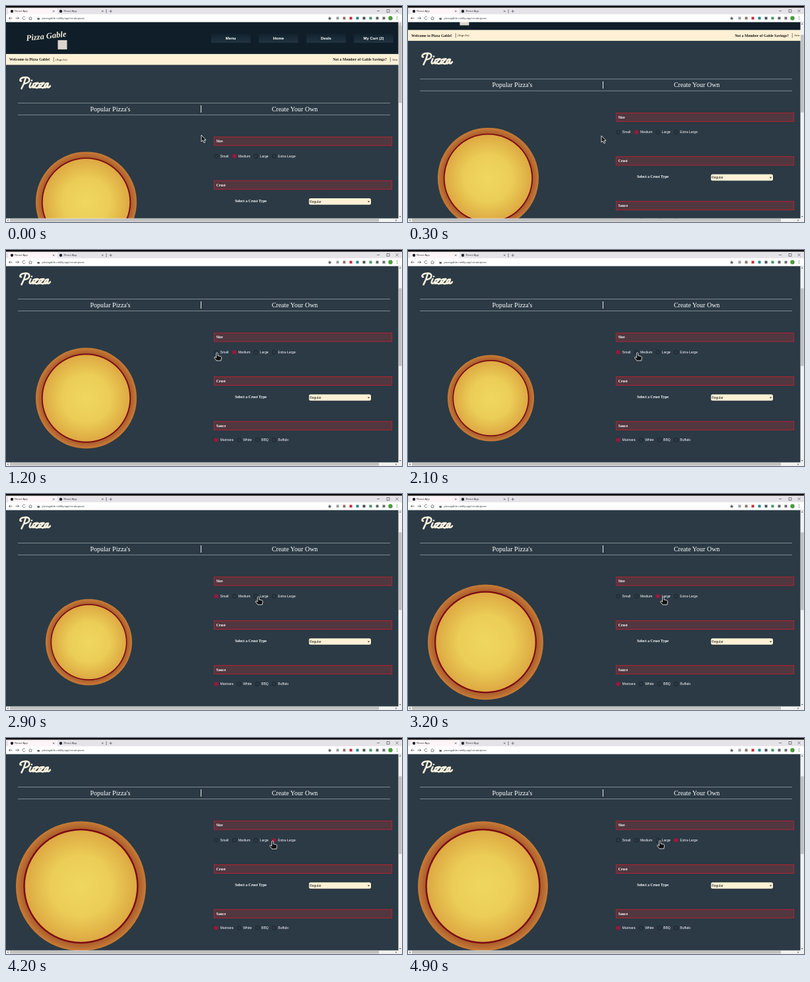
These frames come from a looping animation (600 px wide and 328 px high, 5000 ms). An HTML page:

```html
<!DOCTYPE html>
<html lang="en">
<head>
<meta charset="utf-8">
<title>Pizza builder</title>
<style>
  html, body { margin: 0; width: 100%; height: 100%; overflow: hidden; background: #2b3a45; }
  svg { display: block; width: 100vw; height: 100vh; }
  text { font: 5.07px Arial, "Liberation Sans", sans-serif; fill: #fff; }
  .serif { font: 4.9px "Times New Roman", "Liberation Serif", serif; }
  .bold { font: bold 5.8px "Times New Roman", "Liberation Serif", serif; }
  .tab { font: 10px "Times New Roman", "Liberation Serif", serif; text-anchor: middle; }
  .nav { font-weight: bold; font-size: 6px; text-anchor: middle; }
  .logo { font: italic bold 12.6px "Liberation Serif", serif; fill: #f1ebdc; }
  .ink text { fill: #1c1c20; }
  .ui text { font-size: 4.3px; fill: #3c4043; }
  .line { fill: none; stroke: #5f6368; stroke-width: .8; }
</style>
</head>
<body>
<svg viewBox="0 0 600 328" preserveAspectRatio="none">
  <defs>
    <radialGradient id="crust">
      <stop offset=".86" stop-color="#a4562b"/>
      <stop offset="1" stop-color="#c87c35"/>
    </radialGradient>
    <radialGradient id="cheese">
      <stop offset="0" stop-color="#efd75e"/>
      <stop offset=".55" stop-color="#ebcd57"/>
      <stop offset="1" stop-color="#dda942"/>
    </radialGradient>
    <linearGradient id="button" x2="0" y2="1">
      <stop offset="0" stop-color="#12222d"/>
      <stop offset="1" stop-color="#213440"/>
    </linearGradient>
  </defs>

  <g id="page">
    <rect width="600" height="420" fill="#2b3a45"/>
    <rect width="600" height="73" fill="#0f1e28"/>
    <text class="logo" transform="translate(31 53) rotate(-6)">Pizza Gable</text>
    <rect x="78.5" y="52" width="14" height="14" fill="#d9d6cd"/>
    <g id="nav"></g>

    <g class="ink">
      <rect y="73" width="600" height="16.5" fill="#fff1d5"/>
      <text class="bold" x="5" y="83.3">Welcome to Pizza Gable!</text>
      <text class="serif" x="75" y="83">(Sign In)</text>
      <text class="bold" x="577" y="83.3" text-anchor="end">Not a Member of Gable Savings?</text>
      <text class="serif" x="585" y="83">Join</text>
      <path d="M72.3 78v7M582.3 78v7" stroke="#333" stroke-width=".6"/>
    </g>

    <path id="heading" role="img" aria-label="Pizza" transform="translate(20 107)" fill="none"
      stroke="#f8efdc" stroke-width="2.6" stroke-linecap="round" stroke-linejoin="round"/>
    <path d="M18 147.5H582M18 165.5H582" stroke="#939da2" stroke-width=".8"/>
    <path d="M295.5 151V162" stroke="#fff" stroke-width=".9"/>
    <text class="tab" x="158" y="160">Popular Pizza's</text>
    <text class="tab" x="437.5" y="160">Create Your Own</text>

    <g id="pizza">
      <circle r="1" fill="url(#crust)"/>
      <circle r=".885" fill="#7b0a14"/>
      <circle r=".86" fill="url(#cheese)"/>
    </g>

    <g id="form"></g>
    <text class="bold" x="347" y="297.7">Select a Crust Type</text>
    <g class="ink">
      <rect x="459" y="292.2" width="94" height="9.6" rx="2.5" fill="#fff1d5"/>
      <text x="460" y="299">Regular</text>
      <path d="M547.8 296.4h3.4l-1.7 2z" fill="#333"/>
    </g>
  </g>

  <g class="ui">
    <rect width="600" height="13" fill="#e6e3e8"/>
    <rect width="600" height="2.5" fill="#0b0b0d"/>
    <path d="M3 13V5q0-1.5 1.5-1.5h72q1.5 0 1.5 1.5v8z" fill="#fcf4f7"/>
    <rect y="12.5" width="600" height="12" fill="#fff"/>
    <circle cx="9" cy="8" r="2.2" fill="#20232a"/>
    <circle cx="83" cy="8" r="2.2" fill="#20232a"/>
    <text x="13" y="9.4">React App</text>
    <text x="87.5" y="9.4">React App</text>
    <path class="line" d="M71 6.6l2.6 2.6m0-2.6l-2.6 2.6M145 6.6l2.6 2.6m0-2.6l-2.6 2.6M152 5v6M156.5 8h4.4m-2.2-2.2v4.4
      M562 7.5h4M577 5.5h4v4h-4zM590.5 5.5l4 4m0-4l-4 4
      M9.5 18.5h-5l2-2m-2 2l2 2M14.5 18.5h5l-2-2m2 2l-2 2M29 17.2a2.2 2.2 0 1 0 .2 2M34.5 18.5l2.5-2.2 2.5 2.2M35.3 18.3v2.5h3.4v-2.5"/>
    <path d="M47.5 18h3.4v2.8h-3.4zM490.5 15.8l.9 1.9 2 .2-1.5 1.4.4 2-1.8-1-1.8 1 .4-2-1.5-1.4 2-.2z" fill="#5f6368"/>
    <text x="54.5" y="20.2">pizzagable.netlify.app/createpizza</text>
    <g id="icons"></g>
    <path d="M592.5 16v5" stroke="#5f6368" stroke-dasharray="1 1"/>

    <rect x="594.5" y="24.3" width="6" height="304" fill="#f1f1f1"/>
    <rect y="322.5" width="600" height="6" fill="#f1f1f1"/>
    <rect id="thumb" x="595" width="4.6" height="118" fill="#c1c1c1"/>
    <rect x="6" y="323" width="559" height="4.5" fill="#c1c1c1"/>
    <path d="M595.8 28h2.8l-1.4-1.8zM595.8 319h2.8l-1.4 1.8zM3.5 324v2.8l-1.8-1.4zM590.5 324v2.8l1.8-1.4z" fill="#555"/>
  </g>

  <path id="cursor" fill="#111" stroke="#fff" stroke-width=".8" stroke-linejoin="round"/>
</svg>

<script>
const $ = id => document.getElementById(id);

const LETTER_Z = 'c2.5-2 4.5-1 7-1.5l-7.5 7c3-2 4.5 1.5 7 0 1-1 2-2 2.5-3.5';
$('heading').setAttribute('d',
  'M3 7C0 7 1 2 8 1.5C18 0 18 10 7.5 11M9.5 3.5C8 9 6 14 3.5 18.5' +
  'M17.5 10C16 13 14.5 17 17 17C18.5 17 20 15 21 13.5M19 6.2v.1' +
  'M21.5 11.5' + LETTER_Z + 'M30.5 11.5' + LETTER_Z +
  'M44 11C40 8.5 36.5 17 39.5 17C41.5 17 43 13.5 44 10.5C43 14 42 17 44 17C45.5 17 46.5 15.5 47 14.5');

$('nav').innerHTML = ['Menu', 'Home', 'Deals', 'My Cart (2)'].map((label, i) => {
  const x = 311 + i * 72.1;
  return `<rect x="${x}" y="42" width="59.5" height="14" fill="url(#button)"/>
    <text class="nav" x="${x + 29.7}" y="51">${label}</text>`;
}).join('');

$('icons').innerHTML = ['#9a9da1', '#8a7466', '#c8283c', '#18868c', '#4a5058', '#3f9a5a', '#5f6368', '#6a6d72']
  .map((color, i) => `<rect x="${500.5 + i * 10}" y="16.5" width="4" height="4" fill="${color}"/>`).join('') +
  '<circle cx="582.5" cy="18.5" r="3.2" fill="#4b9b3c"/>';

const bar = (label, y) => `<rect x="315.3" y="${y}" width="269.4" height="13" fill="#51373f" stroke="#c2202f" stroke-width=".9"/>
  <text class="bold" x="318.5" y="${y + 8.4}">${label}</text>`;
const radio = (label, x, y) => `<g class="radio"><circle cx="${x}" cy="${y}" r="2.9" fill="none" stroke-width=".9"/>
  <circle class="dot" cx="${x}" cy="${y}" r="2" fill="#b8103a"/><text x="${x + 6.1}" y="${y + 1.8}">${label}</text></g>`;

$('form').innerHTML =
  bar('Size', 199) + bar('Crust', 265.4) + bar('Sauce', 333.3) +
  radio('Small', 318.5, 228.2) + radio('Medium', 346, 228.2) +
  radio('Large', 378.5, 228.2) + radio('Extra-Large', 406.2, 228.2) +
  radio('Marinara', 318.5, 361.5) + radio('White', 353.2, 361.5) +
  radio('BBQ', 381, 361.5) + radio('Buffalo', 406.2, 361.5);
const radios = [...document.querySelectorAll('.radio')];

function setRadio(group, on) {
  group.firstElementChild.setAttribute('stroke', on ? '#b8103a' : '#15222c');
  group.querySelector('.dot').style.display = on ? '' : 'none';
}
radios.slice(4).forEach((group, i) => setRadio(group, i === 0));

const ARROW = 'M0 0V10L2.4 8 4 11.6 5.8 10.8 4.2 7.4H7Z';
const HAND = 'M-1.2 1Q0-.6 1.2 1V5L5 5.8Q7 6.3 6.8 8.2L6 12.5H-.8L-4 8.5Q-4.2 6.8-2.8 7L-1.2 8.2Z';

// [time, x, y] stops of the pointer
const PATH = [
  [0, 296, 196], [300, 293, 197], [600, 291, 197], [1200, 319.7, 155.5], [1700, 319.7, 155.5],
  [2100, 347.5, 155.5], [2700, 382.3, 155.5], [3100, 382.3, 155.5], [3700, 408.3, 156],
  [4100, 408.3, 156], [4700, 381.7, 155.5], [5000, 381.7, 155.5]
];

function pointer(t) {
  const i = PATH.findIndex(stop => stop[0] > t);
  const [t0, x0, y0] = PATH[i - 1], [t1, x1, y1] = PATH[i];
  const k = (t - t0) / (t1 - t0);
  return [x0 + (x1 - x0) * k, y0 + (y1 - y0) * k];
}

const sizeAt = t => t < 1700 ? 1 : t < 3000 ? 0 : t < 3950 ? 2 : 3;

function draw(t) {
  const scroll = 73 * Math.min(1, t / 600);
  $('page').setAttribute('transform', `translate(0 ${-scroll})`);
  $('thumb').setAttribute('y', 29 + scroll * 0.4);

  const size = sizeAt(t);
  radios.slice(0, 4).forEach((group, i) => setRadio(group, i === size));
  $('pizza').setAttribute('transform', `translate(${125.5 - 4 * size} 298) scale(${65.5 + 11 * size})`);

  const [x, y] = pointer(t);
  $('cursor').setAttribute('d', t < 1150 ? ARROW : HAND);
  $('cursor').setAttribute('transform', `translate(${x} ${y})`);
}

const start = performance.now();
function tick() {
  draw((performance.now() - start) % 5000);
  requestAnimationFrame(tick);
}
tick();
</script>
</body>
</html>
```
